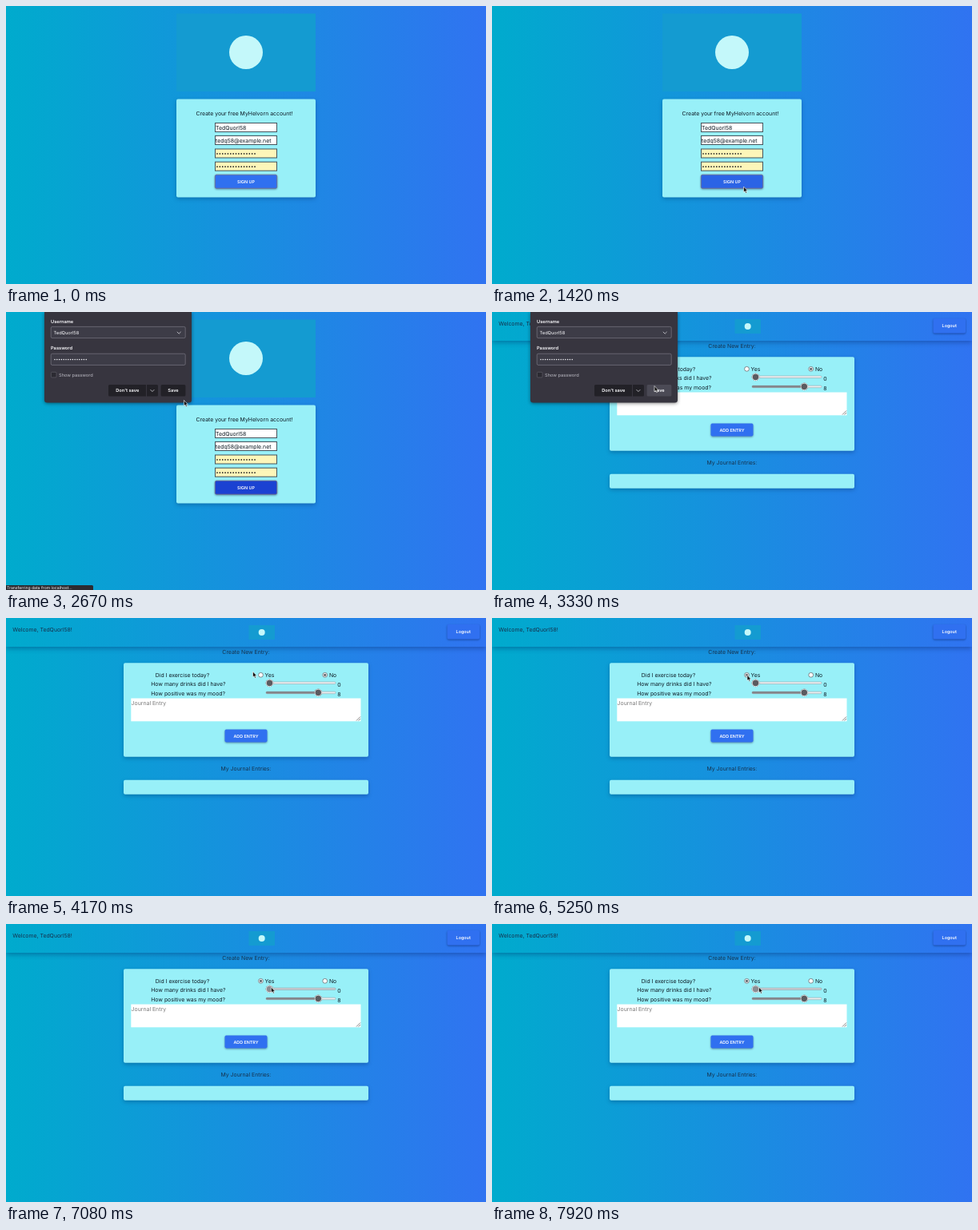
Animation of 600 by 348 pixels, one loop 8000 ms. Source, as an HTML page:

```html
<!DOCTYPE html>
<html lang="en">
<head>
<meta charset="utf-8">
<title>Journal sign-up</title>
<style>
  html, body { margin: 0; width: 100%; height: 100%; overflow: hidden; background: #1890df; }
  svg { display: block; width: 100vw; height: 100vh; }
  text { font: 6.9px Inter, "Open Sans", sans-serif; text-rendering: geometricPrecision; fill: #0d1a24; white-space: pre; }
  .mid { text-anchor: middle; }
  .page { fill: #16314c; }
  .button { font-size: 5.4px; font-weight: 600; fill: #fff; text-anchor: middle; }
  .card { fill: #98f0f8; filter: drop-shadow(0 2px 2.5px rgba(0, 30, 80, .3)); }
  .raised { fill: #3070f0; filter: drop-shadow(0 1px 1.3px rgba(0, 20, 70, .45)); }
  .input { fill: #fff; stroke: #45545c; stroke-width: 1; }
  .filled { fill: #fdf6b9; }
  .panel { fill: #149bd1; }
  .mark { fill: #c4f8fa; }
  #popup text { font-size: 5.7px; fill: #fbfbfe; }
  #popup .bold { font-weight: 600; }
  #popup .field { fill: #3d3c47; stroke: #85848f; stroke-width: .6; }
  #popup .action { fill: #222127; }
  .chevron { fill: none; stroke: #d5d5da; stroke-width: .8; }
  .radio { fill: #fff; stroke: #686d72; stroke-width: .8; }
  .dot { fill: #62666c; }
  .track { fill: #eeeff2; stroke: #8d949b; stroke-width: .5; }
  .thumb { fill: #5b5b60; stroke: #e9eef0; stroke-width: 1; filter: drop-shadow(0 0 .5px #333); }
</style>
</head>
<body>
<svg viewBox="0 0 600 348" preserveAspectRatio="none">
  <defs>
    <linearGradient id="sky" gradientUnits="userSpaceOnUse" x1="0" y1="0" x2="600" y2="0">
      <stop offset="0" stop-color="#00abcd"/>
      <stop offset="1" stop-color="#3073f1"/>
    </linearGradient>
  </defs>
  <rect width="600" height="348" fill="url(#sky)"/>

  <g id="signup">
    <rect class="panel" x="213" y="9.5" width="174" height="97.5"/>
    <circle class="mark" cx="300" cy="58" r="21"/>
    <rect class="card" x="213" y="116.5" width="174" height="123" rx="2"/>
    <text class="mid" x="298" y="137">Create your free MyHelvorn account!</text>
    <rect class="input" x="261.5" y="146.5" width="77" height="11"/>
    <rect class="input" x="261.5" y="162.5" width="77" height="11"/>
    <rect class="input filled" x="261.5" y="179" width="77" height="11"/>
    <rect class="input filled" x="261.5" y="195.2" width="77" height="11"/>
    <text x="262" y="154.6">TedQuorl58</text>
    <text x="262" y="170.8">tedq58@example.net</text>
    <g data-dots="264 184.9 3.36 .85" fill="#222"></g>
    <g data-dots="264 201.2 3.36 .85" fill="#222"></g>
    <rect id="submit" class="raised" x="261.3" y="211.2" width="77.4" height="17" rx="1.8" stroke="#79677f" stroke-width=".7"/>
    <text class="button" x="300" y="221.8">SIGN UP</text>
  </g>

  <g id="journal">
    <rect width="600" height="36" fill="url(#sky)" style="filter: drop-shadow(0 2px 3px rgba(0, 30, 90, .38))"/>
    <text class="page" x="8.3" y="17.3">Welcome, TedQuorl58!</text>
    <rect class="panel" x="303.5" y="9" width="32.5" height="18"/>
    <circle class="mark" cx="319.7" cy="18" r="4"/>
    <rect class="raised" x="551.5" y="8" width="40.5" height="18.5" rx="1.8"/>
    <text class="button" x="571.7" y="19">Logout</text>
    <text class="page mid" x="300" y="45">Create New Entry:</text>

    <rect class="card" x="147" y="56.3" width="306" height="117.5" rx="2"/>
    <text x="186.8" y="73.7">Did I exercise today?</text>
    <text x="181.2" y="84.6">How many drinks did I have?</text>
    <text x="181.2" y="96.6">How positive was my mood?</text>
    <circle class="radio" cx="318.5" cy="71.3" r="2.9"/>
    <circle class="radio" cx="398.7" cy="71.3" r="2.9"/>
    <circle id="choice" class="dot" cy="71.3" r="1.6"/>
    <text x="323.6" y="73.7">Yes</text>
    <text x="403.9" y="73.7">No</text>

    <rect id="drinkTrack" class="track" x="325" y="80" width="87" height="2.5" rx="1.2"/>
    <circle id="drinkThumb" class="thumb" cx="329.5" cy="81.4" r="4.3"/>
    <text x="414.3" y="86">0</text>
    <rect class="track" x="325" y="92.2" width="87" height="2.5" rx="1.2"/>
    <rect x="325" y="92.1" width="65" height="2.7" rx="1.2" fill="#83878c"/>
    <circle class="thumb" cx="390.3" cy="93.4" r="4.3"/>
    <text x="414.3" y="98">8</text>

    <rect x="156.3" y="100.5" width="287.2" height="28.8" fill="#fff"/>
    <text x="156.6" y="108.6" style="fill: #777">Journal Entry</text>
    <path d="M438 128.5l5-5M440.6 128.5l2.4-2.4" stroke="#666" stroke-width=".8"/>
    <rect class="raised" x="273.5" y="139.6" width="53" height="15.8" rx="1.8"/>
    <text class="button" x="300" y="149.5">ADD ENTRY</text>

    <text class="page mid" x="300" y="190.8">My Journal Entries:</text>
    <rect class="card" x="147" y="202.7" width="306" height="18" rx="2"/>
  </g>

  <g id="status">
    <path d="M0 342H107.500Q109 342 109 343.500V348H0Z" fill="#2c2b31"/>
    <text x="1" y="347.4" style="font-size: 5.1px; fill: #f5f5f7">Transferring data from localhost…</text>
  </g>

  <g id="popup">
    <path d="M48 0H232V110Q232 113.500 228.500 113.500H51.500Q48 113.500 48 110Z" fill="#37353f" style="filter: drop-shadow(0 1px 2px rgba(0, 0, 0, .45))"/>
    <text class="bold" x="56" y="14">Username</text>
    <rect class="field" x="56.2" y="18.4" width="168" height="14.2" rx="1.6"/>
    <text x="59.6" y="27.6">TedQuorl58</text>
    <path class="chevron" d="M213.800 24.800l2.400 2.400l2.400 -2.400"/>
    <text class="bold" x="56" y="47.3">Password</text>
    <rect class="field" x="56.2" y="52.2" width="168" height="14.2" rx="1.6"/>
    <g data-dots="61 59.5 2.8 .75" fill="#fbfbfe"></g>
    <rect x="56.4" y="75.3" width="6.6" height="6.6" rx="1" fill="#2b2a32" stroke="#706f79" stroke-width=".5"/>
    <text x="66" y="80.8" style="fill: #bdbcc5">Show password</text>
    <path class="action" d="M129.500 91H175V105.500H129.500Q128 105.500 128 104V92.500Q128 91 129.500 91Z"/>
    <path class="action" d="M176 91H188.500Q190 91 190 92.500V104Q190 105.500 188.500 105.500H176Z"/>
    <path class="chevron" d="M180.500 97.200l2.400 2.400l2.400 -2.400"/>
    <rect id="save" class="action" x="193.6" y="91" width="30.8" height="14.5" rx="1.5"/>
    <text class="bold mid" x="151.800" y="100.2">Don't save</text>
    <text class="bold mid" x="209" y="100.2">Save</text>
  </g>

  <path id="cursor" d="M0 0V7L1.600 5.700L2.700 8.200L3.900 7.600L2.900 5.300H5Z" fill="#111" stroke="#fff" stroke-width=".6" stroke-linejoin="round"/>
</svg>
<script>
  const LOOP = 8000, STEP = 83.2;
  const $ = id => document.getElementById(id);

  // time, x, y of the pointer tip
  const path = [
    [330, 383, 327], [500, 377, 311], [830, 361, 267], [1080, 335, 243], [1250, 316, 228],
    [1420, 314.5, 226], [2160, 314.5, 226], [2330, 284, 184], [2500, 236, 124],
    [2660, 222.5, 110.5], [2830, 218, 106], [3080, 208, 98], [3320, 203, 92.500], [3660, 204, 94],
    [3910, 265, 77], [4160, 308.500, 67], [4580, 317, 70], [5160, 318, 70.500],
    [5580, 323, 75], [5990, 328.500, 78.500], [6660, 328.500, 78.500], [7160, 332, 79], [7900, 333.500, 79]
  ];

  for (const group of document.querySelectorAll("[data-dots]")) {
    const [x, y, gap, r] = group.dataset.dots.split(" ").map(Number);
    for (let i = 0; i < 15; i++) {
      const dot = document.createElementNS(group.namespaceURI, "circle");
      dot.setAttribute("cx", x + i * gap);
      dot.setAttribute("cy", y);
      dot.setAttribute("r", r);
      group.append(dot);
    }
  }

  function pointerAt(t) {
    const next = path.findIndex(p => p[0] > t);
    if (next < 0) return path.at(-1).slice(1);
    if (next === 0) return path[0].slice(1);
    const [t0, x0, y0] = path[next - 1], [t1, x1, y1] = path[next];
    const k = (t - t0) / (t1 - t0);
    return [x0 + (x1 - x0) * k, y0 + (y1 - y0) * k];
  }

  const show = (id, on) => { $(id).style.display = on ? "" : "none"; };
  const paint = (id, color) => { $(id).style.fill = color; };

  function draw(now) {
    const t = Math.floor((now % LOOP) / STEP) * STEP;
    const between = (a, b) => t >= a && t < b;
    show("signup", t < 2800);
    show("journal", t >= 2800);
    show("status", between(1900, 2800));
    show("popup", between(2060, 3650));
    show("cursor", t >= 330);
    paint("submit", t >= 1820 ? "#1b42d2" : t >= 1240 ? "#2b64e6" : "#3070f0");
    paint("save", t >= 3150 ? "#4b4a55" : "#222127");
    $("choice").setAttribute("cx", t >= 4980 ? 318.5 : 398.7);
    paint("drinkThumb", t >= 6730 ? "#8c8c92" : "#5b5b60");
    paint("drinkTrack", t >= 6730 ? "#c9ccd1" : "#eeeff2");
    $("cursor").setAttribute("transform", `translate(${pointerAt(t)})`);
  }

  const start = performance.now();
  function tick() {
    draw(performance.now() - start);
    requestAnimationFrame(tick);
  }
  tick();
</script>
</body>
</html>
```
